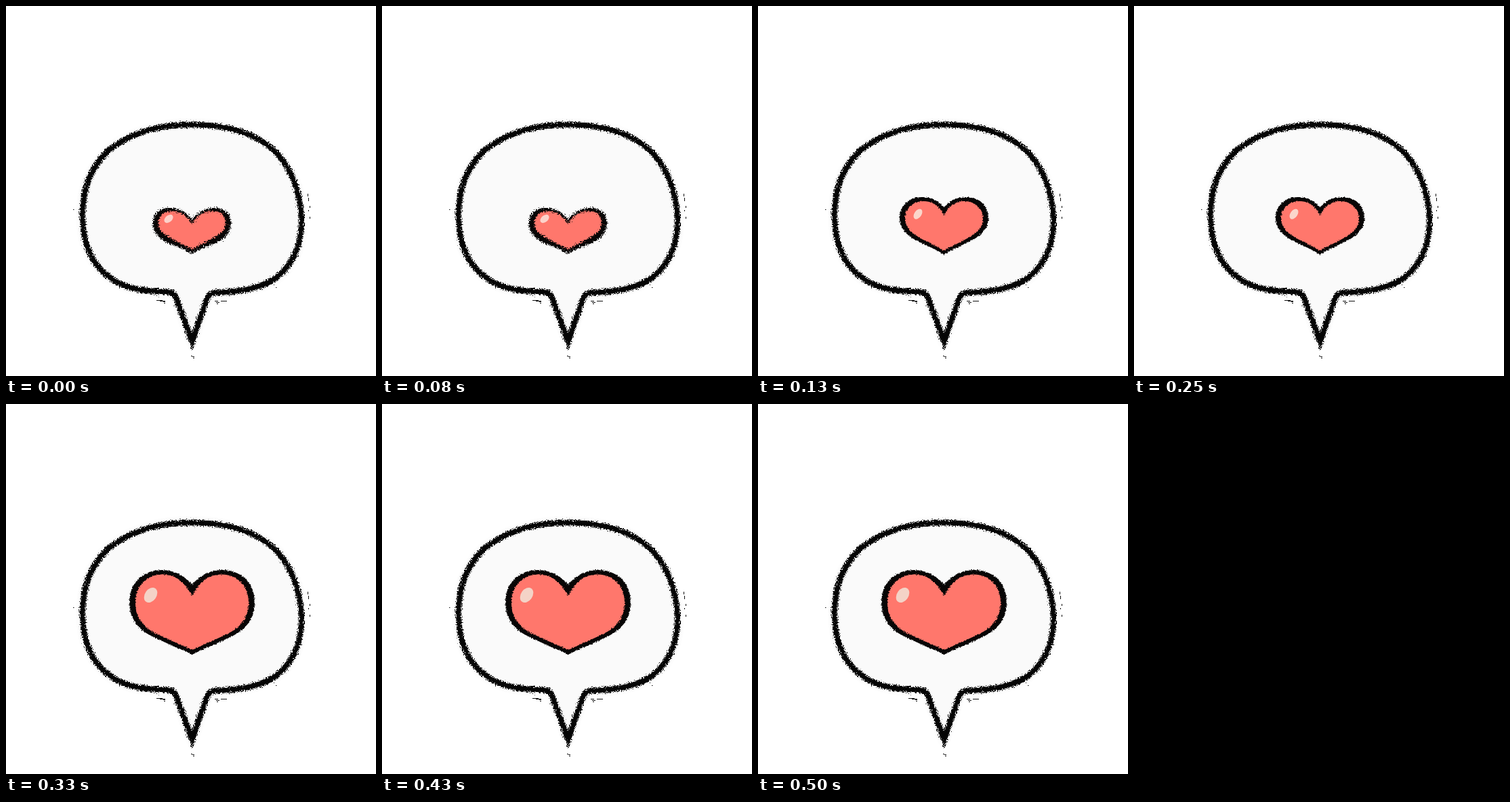
An HTML page that plays this animation: 546 by 546 pixels, repeating every 630 ms.

```html
<!DOCTYPE html>
<html lang="en">
<head>
<meta charset="utf-8">
<title>Heart bubble</title>
<style>
  html, body { margin: 0; width: 100%; height: 100%; overflow: hidden; background: #fff; }
  svg { display: block; width: 100vw; height: 100vh; }
  .pose { visibility: hidden; animation: 630ms step-end infinite; }
  .small { animation-name: small; }
  .medium { animation-name: medium; }
  .large { animation-name: large; }
  /* switches at 130 ms and 330 ms of 630 ms */
  @keyframes small { 0% { visibility: visible; } 20.635%, 100% { visibility: hidden; } }
  @keyframes medium { 0% { visibility: hidden; } 20.635% { visibility: visible; } 52.381%, 100% { visibility: hidden; } }
  @keyframes large { 0% { visibility: hidden; } 52.381%, 100% { visibility: visible; } }
</style>
</head>
<body>
<svg viewBox="0 0 546 546">
  <defs>
    <filter id="crayon" filterUnits="userSpaceOnUse" x="0" y="0" width="546" height="546" color-interpolation-filters="sRGB">
      <feTurbulence type="fractalNoise" baseFrequency=".55" numOctaves="2" seed="4"/>
      <feDisplacementMap in="SourceGraphic" scale="9" xChannelSelector="R" yChannelSelector="G"/>
    </filter>
    <filter id="soft" filterUnits="userSpaceOnUse" x="170" y="235" width="210" height="145" color-interpolation-filters="sRGB">
      <feTurbulence type="fractalNoise" baseFrequency=".5" numOctaves="2" seed="9"/>
      <feDisplacementMap in="SourceGraphic" scale="4" xChannelSelector="R" yChannelSelector="G"/>
    </filter>
    <path id="bubble" d="M274 175 C330 175 376 190 403 221 C426 249 436 284 436 318 C436 362 415 398 378 412 C352 421 330 422 308 423 C300 424 298 428 295 436 L274.5 495 L253 436 C250 427 248 423 240 422 C212 421 180 420 155 402 C125 380 113 350 113 310 C113 270 124 240 150 214 C182 188 225 175 274 175Z"/>
  </defs>

  <use href="#bubble" fill="#fafafa" stroke="#fdfdfd" stroke-width="20" stroke-linejoin="round"/>
  <use href="#bubble" fill="#fafafa"/>
  <use href="#bubble" fill="none" stroke="#050505" stroke-width="8.4" stroke-miterlimit="10" filter="url(#crayon)"/>

  <!-- stray crayon specks -->
  <path fill="none" stroke="#111" d="M222 434.5h9m-4 1h8m-3 1h3m-2 2h2M308 435.5h5m4 0h9m-16 2h5m-4 2h2M445.500 277v4m1 2v5m2 7v3m-2 3v2m2 8v3M99 300.500h1.500M398 415.500h1.500M273 516.500h2m0 1h3m-2 2h2"/>

  <g id="poses"></g>
</svg>
<script>
const AXIS = 274.5;

// Left half from the notch to the tip, then mirrored back to the notch.
function heart(p) {
  const pts = [];
  for (let i = 0; i < p.length; i += 2) pts.push([p[i], p[i + 1]]);
  const back = pts.slice(0, -1).reverse().map(([x, y]) => [2 * AXIS - x, y]);
  const [start, ...rest] = pts.concat(back);
  return `M${start}C${rest.join(' ')}Z`;
}

const poses = [
  { name: 'small', filter: 'crayon',
    outer: [AXIS, 315, 266, 304, 254, 298, 242, 298, 226, 298, 217, 306, 217, 320, 217, 336, 228, 345, 242, 351, 256, 356, 266, 360, AXIS, 366],
    inner: [AXIS, 321, 266, 309, 258, 303, 244, 303, 231, 303, 225, 310, 225, 320, 225, 333, 238, 340, 250, 346, 260, 351, 268, 355, AXIS, 359],
    shine: [240, 314, 7.5, 5, -40, '#fcd2ca'] },
  { name: 'medium', filter: 'soft',
    outer: [AXIS, 297, 265, 286, 254, 282, 242, 282, 221, 282, 209, 296, 209, 313, 209, 330, 222, 341, 240, 349, 254, 356, 266, 361, AXIS, 367],
    inner: [AXIS, 309, 268, 295, 258, 288, 244, 288, 229, 288, 217, 299, 217, 314, 217, 328, 230, 338, 246, 346, 258, 352, 266, 356, AXIS, 361],
    shine: [236, 307, 8.5, 5.2, -55, '#fbd6cb'] },
  { name: 'large', filter: 'soft',
    outer: [AXIS, 266, 262, 253, 248, 245, 230, 245, 202, 245, 182, 264, 182, 292, 182, 318, 196, 333, 214, 342, 235, 353, 258, 361, AXIS, 370],
    inner: [AXIS, 283, 262, 261, 250, 251.500, 230, 251.500, 208, 252, 191, 268, 191, 293, 191, 316, 203, 329, 220, 338, 240, 348, 258, 355, AXIS, 363],
    shine: [213.500, 282, 12, 8.5, -55, '#f4d3c7'] }
];

document.getElementById('poses').innerHTML = poses.map(({ name, filter, outer, inner, shine }) => {
  const [x, y, rx, ry, turn, tint] = shine;
  return `<g class="pose ${name}">
    <g filter="url(#${filter})">
      <path d="${heart(outer)}" fill="#080606"/>
      <path d="${heart(inner)}" fill="#ff776c"/>
    </g>
    <ellipse rx="${rx}" ry="${ry}" fill="${tint}" transform="translate(${x} ${y}) rotate(${turn})"/>
  </g>`;
}).join('');
</script>
</body>
</html>
```
